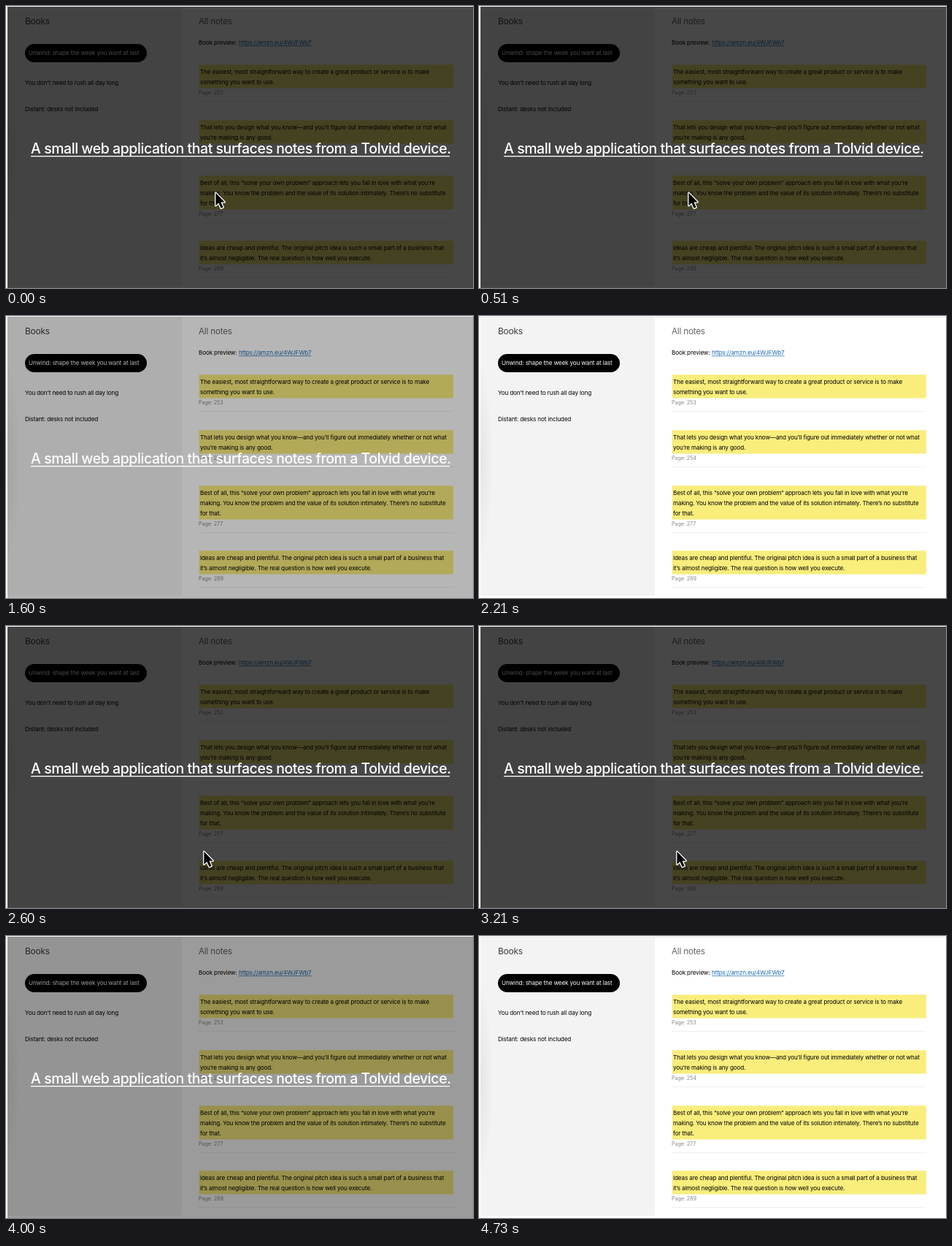
Recreate the animation shown at these times as an HTML page with a canvas. Size 640 px wide and 386 px high, loop 4.78 s.

```html
<!DOCTYPE html>
<html lang="en">
<head>
<meta charset="utf-8">
<title>Reading notes</title>
<style>
  html, body { margin: 0; width: 100%; height: 100%; overflow: hidden; background: #fff; }
  canvas { display: block; width: 100vw; height: 100vh; }
</style>
</head>
<body>
<canvas id="stage"></canvas>
<script>
const W = 640, H = 386, LOOP = 4780;
const canvas = document.getElementById('stage');
const ratio = window.devicePixelRatio || 1;
canvas.width = Math.round(W * ratio);
canvas.height = Math.round(H * ratio);
const ctx = canvas.getContext('2d');
ctx.scale(canvas.width / W, canvas.height / H);

const BODY = 8.15, INK = '#000';
const books = ['Unwind: shape the week you want at last', 'You don\'t need to rush all day long', 'Distant: desks not included'];
const notes = [
  { y: 80, page: 253, lines: ['The easiest, most straightforward way to create a great product or service is to make', 'something you want to use.'] },
  { y: 156, page: 254, lines: ['That lets you design what you know—and you’ll figure out immediately whether or not what', 'you’re making is any good.'] },
  { y: 232, page: 277, lines: ['Best of all, this “solve your own problem” approach lets you fall in love with what you’re', 'making. You know the problem and the value of its solution intimately. There’s no substitute', 'for that.'] },
  { y: 321, page: 289, lines: ['Ideas are cheap and plentiful. The original pitch idea is such a small part of a business that', 'it’s almost negligible. The real question is how well you execute.'] }
];

// Visits of the pointer: [time, x, y] stops
const visits = [
  [[0, 286, 254], [1150, 286, 254], [1430, 268, 392]],
  [[2230, 262, 392], [2540, 270, 307], [3500, 270, 307], [3790, 262, 392]]
];

const smooth = (t, from, to) => {
  const k = Math.min(1, Math.max(0, (t - from) / (to - from)));
  return k * k * (3 - 2 * k);
};

function rect(x, y, w, h, color) {
  ctx.fillStyle = color;
  ctx.fillRect(x, y, w, h);
}

function text(str, x, y, size, color, { weight = 400, spacing = -0.0175 } = {}) {
  ctx.font = `${weight} ${size}px Inter, "Open Sans", sans-serif`;
  ctx.letterSpacing = `${size * spacing}px`;
  ctx.fillStyle = color;
  ctx.fillText(str, x, y);
}

function drawEdgeShade() {
  ctx.save();
  ctx.translate(2, 198);
  ctx.scale(1, 8);
  const shade = ctx.createRadialGradient(0, 0, 0, 0, 0, 17);
  shade.addColorStop(0, 'rgba(0,0,0,.06)');
  shade.addColorStop(1, 'rgba(0,0,0,0)');
  rect(0, -17, 17, 34, shade);
  ctx.restore();
}

function drawSidebar() {
  rect(2, 2, 239, 381, '#f3f3f3');
  drawEdgeShade();
  text('Books', 26, 25, 11.9, '#3c3c3c');
  ctx.fillStyle = '#000';
  ctx.beginPath();
  ctx.roundRect(26, 52, 167, 25, 12.5);
  ctx.fill();
  text(books[0], 31, 67.3, BODY, '#fff');
  text(books[1], 26, 108.2, BODY, INK);
  text(books[2], 26, 144.2, BODY, INK);
}

function drawNotes() {
  text('All notes', 264, 25, 11.7, '#666');
  text('Book preview:', 264, 53.3, BODY, INK);
  const link = 'https://amzn.eu/4WJFWb7';
  text(link, 319, 53.3, BODY, '#1769b5');
  rect(319, 54.4, ctx.measureText(link).width, 0.7, '#1769b5');
  for (const { y, page, lines } of notes) {
    const bottom = y + 4.5 + lines.length * 14;
    rect(264.6, y + 0.3, 348.2, bottom - y - 0.3, '#f9ed7c');
    lines.forEach((line, i) => text(line, 266, y + 12.8 + i * 14, BODY, INK));
    text('Page: ' + page, 264, bottom + 8.8, 7.25, '#888');
    rect(264, bottom + 17.5, 349, 0.8, '#ececec');
  }
}

function drawOverlay(amount) {
  if (!amount) return;
  rect(2, 1, W - 2, H - 1, `rgba(0,0,0,${0.72 * amount})`);
  ctx.globalAlpha = Math.min(1, amount * 2.6);
  text('A small web application that surfaces notes from a Tolvid device.', 34, 202, 19.5, '#fff', { weight: 500, spacing: -0.023 });
  rect(34, 205, 574, 1.3, '#fff');
  ctx.globalAlpha = 1;
}

function pointerAt(t) {
  for (const stops of visits) {
    for (let i = 1; i < stops.length; i++) {
      const [t0, x0, y0] = stops[i - 1], [t1, x1, y1] = stops[i];
      if (t < t0 || t >= t1) continue;
      const k = smooth(t, t0, t1);
      return [x0 + (x1 - x0) * k, y0 + (y1 - y0) * k];
    }
  }
  return null;
}

function drawPointer(pos) {
  if (!pos) return;
  ctx.save();
  ctx.translate(pos[0] + 0.4, pos[1] + 0.8);
  const arrow = new Path2D('M1 1V18.5L5 14.8L8.2 22L11.2 20.7L8 13.6H13.2Z');
  ctx.lineJoin = 'round';
  ctx.lineWidth = 2.6;
  ctx.strokeStyle = '#fff';
  ctx.stroke(arrow);
  ctx.fillStyle = '#000';
  ctx.fill(arrow);
  ctx.restore();
}

function overlayAt(t) {
  if (t < 2000) return 1 - smooth(t, 1430, 1730);
  return smooth(t, 2260, 2560) - smooth(t, 3860, 4160);
}

function draw(t) {
  rect(0, 0, W, H, '#fff');
  rect(0, 1, W, 1, '#e6e6e6');
  drawSidebar();
  drawNotes();
  drawOverlay(overlayAt(t));
  drawPointer(pointerAt(t));
}

const start = performance.now();
function tick() {
  draw((performance.now() - start) % LOOP);
  requestAnimationFrame(tick);
}
tick();
</script>
</body>
</html>
```
